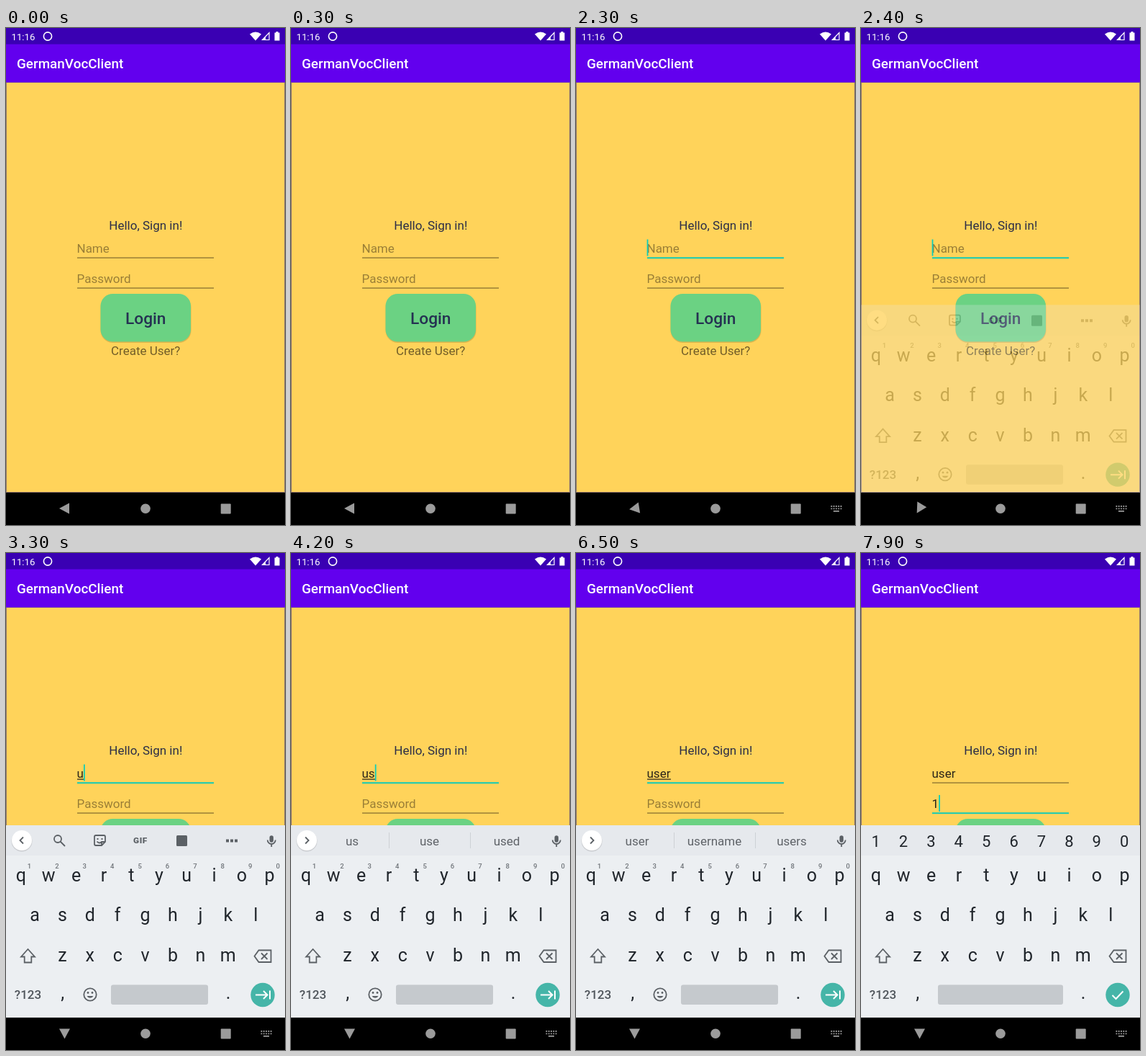
An HTML page that plays this animation: 388 by 690 pixels, repeating every 8000 ms.

```html
<!DOCTYPE html>
<html lang="en">
<head>
<meta charset="utf-8">
<title>Sign in</title>
<style>
html, body { margin: 0; height: 100%; overflow: hidden; background: #000; }
svg { display: block; width: 388px; height: 690px; font-family: Roboto, sans-serif; }
text { white-space: pre; }
.mid { text-anchor: middle; }
.body { font-size: 17px; }
.medium { font-weight: 500; }
.hint { fill: #000; fill-opacity: .4; }
.typed { fill: #2a2519; }
.key { font-size: 25px; fill: #20252b; }
.digit { font-size: 22px; fill: #20252b; }
.super { font-size: 9.5px; font-weight: 500; fill: #70757a; }
.word { font-size: 17px; fill: #5f6368; }
.line { fill: none; stroke: #5b6065; stroke-width: 1.8; }
.solid { fill: #5b6065; }
.nav { fill: #9b9b9b; }
</style>
</head>
<body>
<svg viewBox="0 0 388 690">
  <rect width="388" height="690" fill="#ffd35a"/>
  <rect x=".5" y="75.5" width="387" height="569" fill="none" stroke="#40307a" stroke-opacity=".55"/>
  <rect width="388" height="75.5" fill="#6200ee"/>
  <rect width="388" height="22.5" fill="#3a00b3"/>
  <g fill="#fff">
    <text x="7.5" y="16.5" font-size="13.2">11:16</text>
    <text x="15" y="56" font-size="18.9" class="medium">GermanVocClient</text>
    <circle cx="58" cy="11.5" r="5.6" fill="none" stroke="#fff" stroke-width="1.6"/>
    <path d="M339 8.5Q347 2.500 355 8.500L347 17.500Z"/>
    <path d="M356.500 16.500H366V6.500Z" fill="none" stroke="#fff" stroke-width="1.2"/>
    <path d="M355.500 17L361 11.500V17Z"/>
    <path d="M373.500 6.500H375.500V5H378.500V6.500H380.500V17.500H373.500Z"/>
  </g>

  <text x="194.300" y="279.700" class="body mid" fill="#2c2e47">Hello, Sign in!</text>
  <text id="nameHint" x="98.500" y="312" class="body hint">Name</text>
  <text id="name" x="98.500" y="312" class="body typed"></text>
  <rect id="compose" x="99" y="313.500" height="1.2" fill="#2a2519"/>
  <rect id="nameLine" x="99" width="190"/>
  <text id="passHint" x="98.500" y="354" class="body hint">Password</text>
  <text id="pass" x="98.500" y="354" class="body typed"></text>
  <rect id="passLine" x="99" width="190"/>
  <rect id="cursor" width="1.800" height="23" fill="#10cdb8"/>
  <rect x="131.500" y="371" width="126" height="66" rx="17" opacity=".14"/>
  <rect x="131.500" y="369" width="125.500" height="66.500" rx="17" fill="#6bd283"/>
  <text x="194.200" y="411" font-size="22.700" class="mid medium" fill="#253252">Login</text>
  <text x="194.200" y="453.500" class="body mid" fill-opacity=".56">Create User?</text>

  <g id="keyboard">
    <rect y="378" width="388" height="267" fill="#eceff2"/>
    <rect y="378" width="388" height="42" fill="#e6e9ed"/>
    <g id="keys"></g>
    <g id="numbers"></g>
    <g id="supers"></g>
    <g id="strip">
      <circle cx="22" cy="400" r="14.500" opacity=".12"/>
      <circle cx="22" cy="399" r="14" fill="#fff"/>
      <path id="chevron" d="M-2 -4.500L2.500 0L-2 4.500" class="line"/>
      <path d="M366.500 395a2.700 2.700 0 0 1 5.400 0v4a2.700 2.700 0 0 1 -5.400 0z" class="solid"/>
      <path d="M363.700 398.500a5.500 5.500 0 0 0 11 0M369.200 404v4" class="line"/>
    </g>
    <g id="tools">
      <circle cx="72" cy="397" r="5" class="line"/>
      <path d="M75.500 400.500L82 407" class="line" stroke-width="2.200"/>
      <path d="M125 392h11q2 0 2 2v7l-5 5h-8q-2 0 -2 -2v-10q0 -2 2 -2zM133 406v-5h5M126.500 400.500q3 3.500 6 1" class="line" stroke-width="1.600"/>
      <path d="M126.500 396h2v2h-2zM132.500 396h2v2h-2z" class="solid"/>
      <text x="187" y="403" font-size="11.800" font-weight="900" letter-spacing=".6" class="mid solid">GIF</text>
      <rect x="237" y="392" width="15" height="15" rx="1.500" class="solid"/>
      <path d="M306 397.500h4v4h-4zM312 397.500h4v4h-4zM318 397.500h4v4h-4z" class="solid"/>
    </g>
    <g id="words">
      <path d="M136.500 388v22M249.500 388v22" stroke="#cdd1d5"/>
      <text x="85" y="406" class="word mid"></text>
      <text x="192.500" y="406" class="word mid"></text>
      <text x="300" y="406" class="word mid"></text>
    </g>
    <path d="M30.500 550L21 560.500h4.700v8h9.600v-8h4.700z" class="line"/>
    <path d="M351.500 551.500h17v16.500h-17l-6 -8.250zM355 555.500l8.500 8.500M363.500 555.500l-8.500 8.500" class="line"/>
    <text x="30.500" y="619" class="mid medium" font-size="17" fill="#50565c">?123</text>
    <g id="emoji">
      <circle cx="117" cy="613" r="8.700" class="line"/>
      <circle cx="114" cy="610.500" r="1.400" class="solid"/>
      <circle cx="120" cy="610.500" r="1.400" class="solid"/>
      <path d="M112.500 615a5 5 0 0 0 9 0z" class="solid"/>
    </g>
    <rect id="space" y="599.500" height="27.500" rx="3" fill="#c5c9cd"/>
    <circle cx="357" cy="613.500" r="16.700" fill="#45b5a8"/>
    <path id="action" fill="none" stroke="#fff" stroke-width="2"/>
  </g>

  <rect y="645" width="388" height="45"/>
  <path id="back" d="M-7.500 0L6.500 -7.500V7.500Z" class="nav"/>
  <circle cx="194" cy="667.300" r="6.800" class="nav"/>
  <rect x="298.700" y="660.500" width="14" height="14" rx="1" class="nav"/>
  <g id="switcher" stroke="#9b9b9b" stroke-width="1.800">
    <path d="M354.500 664h15M354.500 667.300h15" stroke-dasharray="1.800 1.500"/>
    <path d="M358 670.800h8"/>
  </g>
</svg>
<script>
const LOOP = 8000, FOCUS = 2150, KEYBOARD = 2340, NEXT = 6800, DIGIT = 7650;
const typing = [[3200, "u"], [3800, "us"], [4300, "use"], [4800, "user"]];
const suggestions = [
  [3500, "u up us"], [4000, "us use used"],
  [4600, "use used user"], [5200, "user username users"]
];
const $ = id => document.getElementById(id);
const words = [...$("words").querySelectorAll("text")];

const set = (el, attrs) => { for (const k in attrs) el.setAttribute(k, attrs[k]); };
const show = (id, on) => $(id).style.display = on ? "" : "none";
const latest = (list, t) => list.filter(step => step[0] <= t).pop();
const progress = (t, start, length) => Math.min(1, Math.max(0, (t - start) / length));

function row(parent, chars, x, y, cls) {
  [...chars].forEach((c, i) => {
    const el = document.createElementNS("http://www.w3.org/2000/svg", "text");
    set(el, { x: x + i * 38.4, y, class: cls + " mid" });
    el.textContent = c;
    $(parent).append(el);
  });
}
row("keys", "qwertyuiop", 20.8, 456, "key");
row("keys", "asdfghjkl", 40, 511, "key");
row("keys", "zxcvbnm", 78.4, 567, "key");
row("keys", ",", 78.6, 619, "key");
row("keys", ".", 309, 619, "key");
row("numbers", "1234567890", 20.6, 408, "digit");
row("supers", "1234567890", 32.5, 437.5, "super");

function field(id, text, y, focused) {
  $(id).textContent = text;
  show(id + "Hint", !text);
  set($(id + "Line"), focused
    ? { y: y - .3, height: 2, fill: "#14cbb5", "fill-opacity": 1 }
    : { y, height: 1.1, fill: "#000", "fill-opacity": .55 });
}

function draw(t) {
  const inPass = t >= NEXT, inName = t >= FOCUS && !inPass;
  const typed = latest(typing, t), choice = latest(suggestions, t);
  const name = typed ? typed[1] : "", pass = t >= DIGIT ? "1" : "";
  field("name", name, 318.5, inName);
  field("pass", pass, 360.5, inPass);
  set($("compose"), { width: $("name").getComputedTextLength() });
  show("compose", inName && name);

  // The caret blinks every half second and restarts on each edit.
  const edits = [FOCUS, ...typing.map(step => step[0]), NEXT, DIGIT];
  const lastEdit = edits.filter(e => e <= t).pop();
  show("cursor", lastEdit && (t - lastEdit) % 1000 < 500);
  set($("cursor"), {
    x: 98.6 + $(inPass ? "pass" : "name").getComputedTextLength(),
    y: inPass ? 336 : 293.5
  });

  const p = progress(t, KEYBOARD, 250), rise = 1 - (1 - p) ** 5;
  set($("keyboard"), { transform: `translate(0 ${27 * (1 - rise)})`, opacity: p });
  show("numbers", inPass);
  ["supers", "strip", "emoji"].forEach(id => show(id, !inPass));
  show("tools", !inPass && !choice);
  show("words", !inPass && choice);
  if (choice) choice[1].split(" ").forEach((w, i) => words[i].textContent = w);
  set($("chevron"), { transform: `translate(22 399) scale(${choice ? 1 : -1} 1)` });
  const left = inPass ? 107 : 146;
  set($("space"), { x: left, width: 281 - left });
  set($("action"), { d: inPass
    ? "M349.500 614l5 5l10 -10.500"
    : "M347 613.500h16M358 608l5.500 5.500l-5.500 5.500M367 607.500v12" });

  const turn = progress(t, 2250, 250);
  set($("back"), { transform: `translate(81.500 667) rotate(${-45 * (1 - Math.cos(Math.PI * turn))})` });
  show("switcher", t >= 2250);
}

function tick() {
  draw(performance.now() % LOOP);
  requestAnimationFrame(tick);
}
tick();
</script>
</body>
</html>
```
